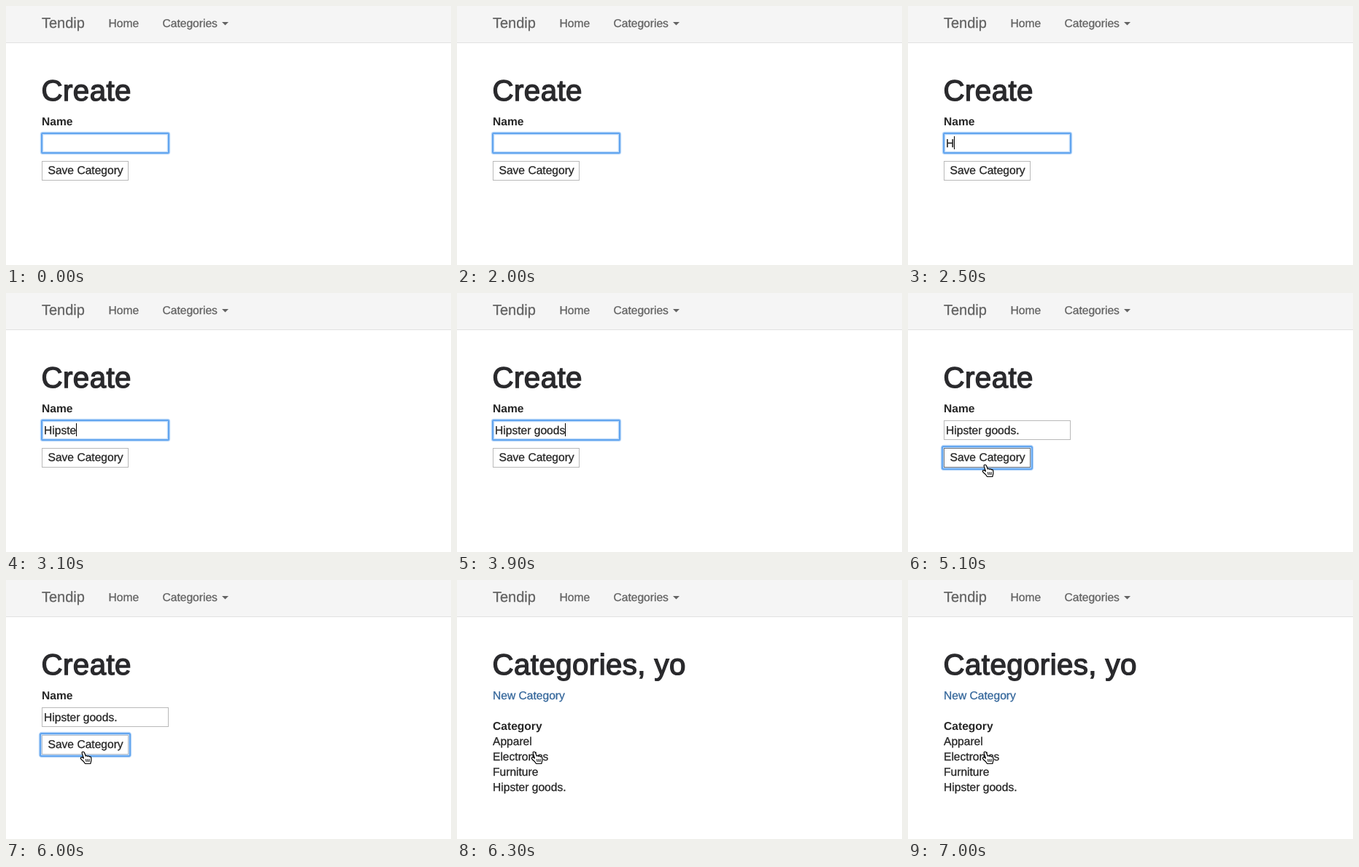
Recreate the animation shown at these times as an HTML page. Size 610x356 px, loop 7.4 s.

```html
<!DOCTYPE html>
<html lang="en">
<head>
<meta charset="utf-8">
<title>Create category</title>
<style>
  html, body { margin: 0; width: 100%; height: 100%; overflow: hidden; background: #fff; }
  svg { display: block; width: 610px; height: 356px; }
  text {
    font: 15.6px "Liberation Sans", Arial, sans-serif; text-rendering: geometricPrecision; white-space: pre;
    color: #262626; fill: currentColor; stroke: currentColor; stroke-width: .3px;
  }
  .nav { color: #636363; }
  .brand { font-size: 20px; }
  .title { font-size: 40.3px; letter-spacing: .4px; color: #2a2a2d; stroke-width: 1.4px; }
  .bold { font-weight: bold; stroke: none; }
  .link { color: #35679b; }
  .box { fill: #fff; stroke: #b9b9b9; }
  .ring rect { fill: none; stroke: #62a5ef; stroke-width: 2; }
  .ring .glow { stroke: #8fc0f6; stroke-width: 4.5; opacity: .6; }
</style>
</head>
<body>
<svg viewBox="0 0 610 356">
  <rect width="610" height="50" fill="#f5f5f5"/>
  <rect y="50" width="610" height="1" fill="#e1e1e1"/>
  <text class="nav brand" x="49" y="30">Tendip</text>
  <text class="nav" x="140.5" y="29">Home</text>
  <text class="nav" x="214.5" y="29">Categories</text>
  <path d="M296 22h9l-4.5 4.5z" fill="#636363"/>

  <g id="form">
    <text class="title" x="48.5" y="130">Create</text>
    <text class="bold" x="49" y="164">Name</text>
    <rect class="box" x="49.5" y="175.5" width="173" height="26"/>
    <g id="inputRing" class="ring">
      <rect class="glow" x="49" y="175" width="174" height="27" rx="1.5"/>
      <rect x="49" y="175" width="174" height="27" rx="1"/>
    </g>
    <text id="entry" x="52" y="194"></text>
    <rect id="caret" y="179" width="1" height="18" fill="#000"/>
    <g id="buttonRing" class="ring">
      <rect class="glow" x="47" y="211" width="123" height="31" rx="2"/>
      <rect x="47" y="211" width="123" height="31" rx="1.5"/>
    </g>
    <rect id="button" class="box" x="49.5" y="213.5" width="118" height="26"/>
    <text x="57.5" y="231">Save Category</text>
  </g>

  <g id="list">
    <text class="title" x="48.5" y="130">Categories, yo</text>
    <text class="link" x="49" y="164">New Category</text>
    <text class="bold" x="49" y="206">Category</text>
    <text x="49" y="227">Apparel</text>
    <text x="49" y="248">Electronics</text>
    <text x="49" y="269">Furniture</text>
    <text x="49" y="290">Hipster goods.</text>
  </g>

  <!-- Both pointers have their hot spot at 0,0 -->
  <path id="arrow" d="M0 0V14.2L3.3 11.2 5.6 16.4 8 15.3 5.8 10.3H10Z" fill="#000" stroke="#fff"/>
  <g id="hand" stroke="#000" stroke-width="1.2" stroke-linejoin="round" stroke-linecap="round">
    <path d="M1.4 9L-.7 2.4Q-1.2 0 .4 0T2.8 2L4.2 6Q5.5 4.8 6.7 6.3 8.2 5.2 9.3 6.8 11.4 6.2 11.8 8.6 12.5 12 10.8 16.5H3.6Q2 13.6-1.6 10.8-3.6 8.6-2 7.8-.4 7.4 1.4 9Z" fill="#fff"/>
    <path d="M4.5 10.5l.5 3M6.8 10.5l.3 3M9.1 10.5v3" stroke-width="1"/>
  </g>
</svg>
<script>
  const LOOP = 7400;
  const TEXT = "Hipster goods.";
  const KEY_TIMES = [2500, 2900, 3000, 3000, 3100, 3100, 3500, 3600, 3700, 3700, 3800, 3900, 3900, 4000];
  const MOVE = { start: 4200, duration: 720, from: [575, 348], to: [105, 236] };
  const PRESS = 5000, RELEASE = 5800, SAVED = 6300;

  const el = id => document.getElementById(id);
  const show = (id, on) => el(id).setAttribute("display", on ? "inline" : "none");

  function caretOn(t) {
    return t < 2300 ? t % 1000 >= 400 && t % 1000 < 900 : t < 4500;
  }

  function drawForm(t) {
    const entry = el("entry");
    entry.textContent = TEXT.slice(0, KEY_TIMES.filter(k => k <= t).length);
    const typed = entry.textContent ? entry.getComputedTextLength() : 0;
    el("caret").setAttribute("x", Math.round(52 + typed));
    show("caret", caretOn(t));
    show("inputRing", t < PRESS);
    show("buttonRing", t >= PRESS);
    el("button").style.stroke = t < PRESS ? "#b9b9b9" : t < RELEASE ? "#6c737c" : "#b4bcc6";
  }

  function drawPointer(t) {
    const left = Math.max(0, 1 - (t - MOVE.start) / MOVE.duration) ** 3;
    const [x, y] = MOVE.to.map((end, i) => Math.round(end + (MOVE.from[i] - end) * left));
    const overButton = y < 240;
    for (const id of ["arrow", "hand"]) {
      el(id).setAttribute("transform", `translate(${x} ${y})`);
      show(id, t >= MOVE.start && overButton === (id === "hand"));
    }
  }

  function draw(now) {
    const t = Math.floor(now % LOOP / 100) * 100;
    show("form", t < SAVED);
    show("list", t >= SAVED);
    drawForm(t);
    drawPointer(t);
  }

  function frame() {
    draw(performance.now());
    requestAnimationFrame(frame);
  }
  frame();
</script>
</body>
</html>
```
